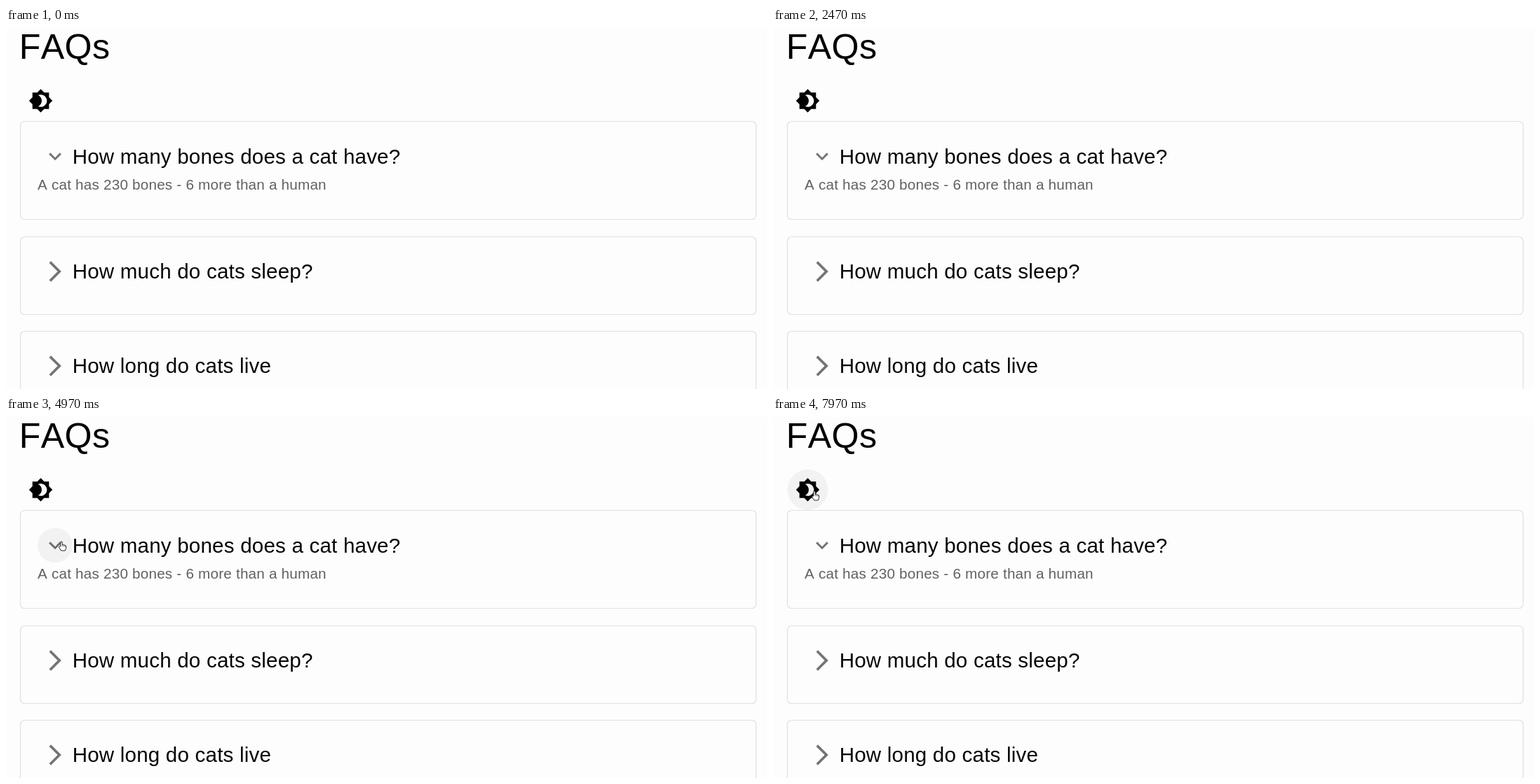
An HTML page with a canvas that plays this animation: 1085 px wide and 516 px high, repeating every 8 s.

```html
<!DOCTYPE html>
<html lang="en">
<head>
<meta charset="utf-8">
<title>FAQs</title>
<style>
html, body { margin: 0; width: 100%; height: 100%; overflow: hidden; background: #fdfdfd; }
canvas { display: block; }
</style>
</head>
<body>
<canvas id="stage" width="1085" height="516"></canvas>
<script>
const ctx = document.getElementById('stage').getContext('2d');
const LOOP = 8000;
const SCALE = 1.475;
const FONT = '"Liberation Sans", Arial, sans-serif';

const ICONS = {
  closed: new Path2D('M6.23 20.23 8 22l10-10L8 2 6.23 3.77 14.46 12z'),
  open: new Path2D('M16.59 8.59 12 13.17 7.41 8.59 6 10l6 6 6-6z'),
  theme: new Path2D('M20 8.69V4h-4.69L12 .69 8.69 4H4v4.69L.69 12 4 15.31V20h4.69L12 23.31 15.31 20H20v-4.69L23.31 12z' +
    'M12 18c-.89 0-1.74-.2-2.5-.55C11.56 16.5 13 14.42 13 12s-1.44-4.5-3.5-5.45C10.26 6.2 11.11 6 12 6c3.31 0 6 2.69 6 6s-2.69 6-6 6z')
};
const HAND = new Path2D('M-1.2 7V1Q-1.2 0 0 0T1.2 1V4.6Q2.3 4 3.2 5Q4.4 4.5 5 5.5Q6.6 5.2 6.6 6.8V9.5L5.4 13H-.2L-3.3 8.6Q-3.8 7.3-2.6 7.2Z');
const ARROW = new Path2D('M0 0V13L3 10.3 5 14.6 6.9 13.7 5 9.5H9Z');

// press = mouse down, release = mouse up, which toggles the card
const CLICKS = [
  { card: 0, press: 3240, release: 3480 },
  { card: 0, press: 4075, release: 4335 },
  { card: 1, press: 5633, release: 5900 },
  { card: 1, press: 6504, release: 6765 }
];
const CARDS = [
  { title: 'How many bones does a cat have?', answer: 'A cat has 230 bones - 6 more than a human', open: true, hover: [3040, 5190] },
  { title: 'How much do cats sleep?', answer: 'The average cat sleeps 12-16 hours per day', hover: [5440, 7570] },
  { title: 'How long do cats live', answer: '' }
];
const THEME_HOVER = [7760, 8400];
const MOVES = [
  { from: 2700, to: 3150, a: [190, 262], b: [79, 178] },
  { from: 5100, to: 5560, a: [79, 178], b: [66.5, 332] },
  { from: 7500, to: 7840, a: [66.5, 332], b: [59, 106] }
];

const clamp = v => Math.min(1, Math.max(0, v));
const span = (t, a, b) => clamp((t - a) / (b - a));
const mix = (a, b, k) => a + (b - a) * k;

// cubic-bezier(.4, 0, .2, 1)
function ease(x) {
  let lo = 0, hi = 1;
  for (let i = 0; i < 16; i++) {
    const s = (lo + hi) / 2, r = 1 - s;
    if (1.2 * r * r * s + 0.6 * r * s * s + s * s * s < x) lo = s; else hi = s;
  }
  return lo * lo * (3 - 2 * lo);
}

function text(str, x, y, size, spacing, color) {
  ctx.font = `${size}px ${FONT}`;
  ctx.letterSpacing = `${size * spacing}px`;
  ctx.fontKerning = 'none';
  ctx.fillStyle = color;
  ctx.fillText(str, x, y);
}

function disc(x, y, r, alpha) {
  if (alpha <= 0) return;
  ctx.fillStyle = `rgba(0,0,0,${alpha})`;
  ctx.beginPath();
  ctx.arc(x, y, r, 0, Math.PI * 2);
  ctx.fill();
}

function icon(path, x, y, color) {
  ctx.save();
  ctx.translate(x, y);
  ctx.scale(SCALE, SCALE);
  ctx.translate(-12, -12);
  ctx.fillStyle = color;
  ctx.fill(path);
  ctx.restore();
}

function hoverAlpha(t, range) {
  if (!range) return 0;
  return 0.045 * span(t, range[0], range[0] + 150) * (1 - span(t, range[1], range[1] + 150));
}

function ripple(t, click, x, y) {
  if (t < click.press) return;
  const grow = ease(span(t, click.press, click.press + 550));
  const fade = 1 - ease(span(t, click.release, click.release + 550));
  disc(x, y, 25 * grow, 0.54 * mix(0.1, 0.3, grow) * fade);
}

function scrollAt(t) {
  return 13.5 * ease(span(t, 90, 260)) * (1 - ease(span(t, 660, 820)));
}

function drawCard(t, card, index, cy) {
  const clicks = CLICKS.filter(c => c.card === index);
  const flips = clicks.filter(c => t >= c.release).length;
  const open = !!card.open !== (flips % 2 === 1);
  const top = Math.floor(cy - 49.9) + 0.5;

  ctx.strokeStyle = '#e0e0e0';
  ctx.lineWidth = 1.2;
  ctx.beginPath();
  ctx.roundRect(20.5, top, 1049, open ? 140 : 111, 6);
  ctx.stroke();

  disc(70, cy, 25, hoverAlpha(t, card.hover));
  icon(open ? ICONS.open : ICONS.closed, 70, cy, 'rgba(0,0,0,0.54)');
  clicks.forEach(c => ripple(t, c, 70, cy));
  const base = Math.round(cy + 10.3);
  text(card.title, 94.7, base, 29.5, 0.0075, '#050505');
  if (open) text(card.answer, 45, base + 37, 20.65, 0.01071, 'rgba(0,0,0,0.62)');
  return open;
}

function drawCursor(t) {
  const move = MOVES.filter(m => t >= m.from).pop();
  if (!move) return;
  const k = ease(span(t, move.from, move.to));
  const over = [...CARDS.map(c => c.hover), THEME_HOVER].some(h => h && t >= h[0] && t < h[1]);
  const shape = over ? HAND : ARROW;
  ctx.save();
  ctx.translate(mix(move.a[0], move.b[0], k), mix(move.a[1], move.b[1], k));
  ctx.fillStyle = '#fff';
  ctx.fill(shape);
  ctx.strokeStyle = '#222';
  ctx.lineWidth = 1;
  ctx.stroke(shape);
  if (over) {
    ctx.lineWidth = 0.6;
    ctx.stroke(new Path2D('M1.2 4.6V7.2M3.2 5V7.4M5 5.5V7.6'));
  }
  ctx.restore();
}

function draw(t) {
  const scroll = scrollAt(t);
  ctx.fillStyle = '#fdfdfd';
  ctx.fillRect(0, 0, 1085, 516);

  text('FAQs', 18.8, Math.round(43.9 - scroll), 50.15, 0.00735, '#000');
  disc(49.5, 104 - scroll, 29, hoverAlpha(t, THEME_HOVER));
  icon(ICONS.theme, 49.5, 104 - scroll, '#000');

  let cy = 183.4 - scroll;
  CARDS.forEach((card, i) => {
    const open = drawCard(t, card, i, cy);
    cy += open ? 164.6 : 135.1;
  });
  drawCursor(t);
}

const start = performance.now();
function tick() {
  draw((performance.now() - start) % LOOP);
  requestAnimationFrame(tick);
}
tick();
</script>
</body>
</html>
```
